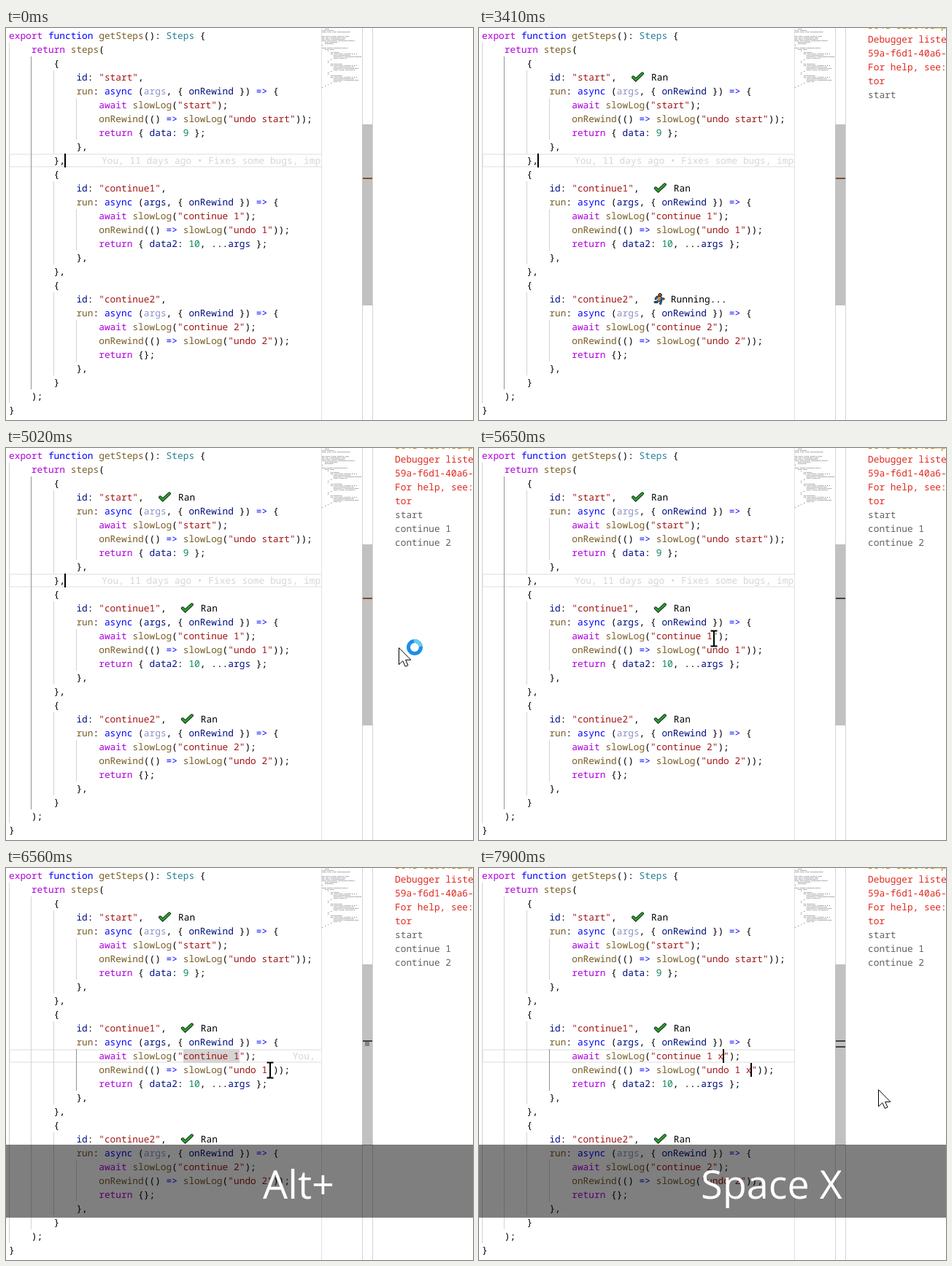
An HTML page for the animation above (7990 ms loop, 640 px wide and 537 px high).

```html
<!DOCTYPE html>
<html lang="en">
<head>
<meta charset="utf-8">
<title>Step runner</title>
<style>
  html, body { margin: 0; width: 100%; height: 100%; overflow: hidden; background: #fff; }
  svg { display: block; }
  #stage { width: 100vw; height: 100vh; }
  text { font: 12.83px "Noto Sans Mono", "DejaVu Sans Mono", monospace; text-rendering: geometricPrecision; }
  #keys { font: 54px "Open Sans", "Noto Sans", sans-serif; fill: #fff; text-anchor: middle; }
</style>
</head>
<body>
<svg id="stage" viewBox="0 0 640 537">
  <svg width="433" height="537">
    <rect id="current" x="5" width="440" height="17" fill="none" stroke="#eee" stroke-width="2"/>
    <rect id="occurrence" x="243" y="248" width="77" height="19" fill="#d5d5d5"/>
    <g id="guides" fill="none" stroke="#d3d3d3"></g>
    <path id="activeGuide" fill="none" stroke="#939393"/>
    <g id="code"></g>
    <text id="blame" fill="#d6d6d6">You, 11 days ago • Fixes some bugs, improves</text>
    <g id="status"></g>
    <g id="carets"></g>
  </svg>

  <path d="M432.5 0V537" stroke="#e2e2e2"/>
  <path id="minimap" fill="none" stroke="#444" stroke-opacity=".6" stroke-dasharray="1.4 .6"/>
  <rect id="mapSlider" x="433" y="26" width="55" height="57" fill="#646464" fill-opacity=".2"/>
  <path d="M488.5 0V537M502.5 0V537" stroke="#d4d4d4"/>
  <rect id="scroll" x="488" y="132" width="14" height="248"/>
  <g id="ruler"></g>
  <g id="terminal"></g>

  <g id="band">
    <rect y="379" width="640" height="100" fill-opacity=".5"/>
    <text id="keys" x="401" y="453"></text>
  </g>

  <g id="mouse">
    <g id="arrow">
      <path d="M.5.7V23.7L5.8 18.7 9.3 26.3 13 24.7 9.6 17.3H16.8Z" fill="#fff" stroke="#000"/>
      <g id="busy" transform="translate(22)" fill="none" stroke-width="5">
        <circle r="8.5" stroke="#1d8fe6"/>
        <path id="spark" d="M-8.5 0A8.5 8.5 0 0 1 0-8.5" stroke="#62cdf5"/>
      </g>
    </g>
    <g id="beam" fill="none">
      <path d="M-5-10.5H5M0-11V11M-5 10.5H5" stroke="#fff" stroke-width="4"/>
      <path d="M-4.5-10.5H-1L0-9.5 1-10.5H4.5M0-10V10M-4.5 10.5H-1L0 9.5 1 10.5H4.5" stroke="#000" stroke-width="2"/>
    </g>
  </g>
</svg>

<script>
const LOOP = 7990, LINE = 19, CHAR = 7.7;
const el = id => document.getElementById(id);
const colX = col => 4 + col * CHAR;
const lineY = line => 1 + line * LINE;
const show = (id, on) => el(id).setAttribute("visibility", on ? "visible" : "hidden");
const set = (id, attrs) => { for (const k in attrs) el(id).setAttribute(k, attrs[k]); };

// Source text
const stepLines = (id, log, undo, result, end) => [
  "        {",
  `            id: "${id}",`,
  "            run: async (args, { onRewind }) => {",
  `                await slowLog("${log}");`,
  `                onRewind(() => slowLog("${undo}"));`,
  `                return ${result};`,
  "            },",
  "        }" + end];

const sourceLines = suffix => [
  "export function getSteps(): Steps {",
  "    return steps(",
  ...stepLines("start", "start", "undo start", "{ data: 9 }", ","),
  ...stepLines("continue1", "continue 1" + suffix, "undo 1" + suffix, "{ data2: 10, ...args }", ","),
  ...stepLines("continue2", "continue 2", "undo 2", "{}", ""),
  "    );",
  "}"];

function tokenColor(token, next) {
  if (token[0] === '"') return "#a31515";
  if (/^(export|return|await)$/.test(token)) return "#af00db";
  if (/^(function|async|=>)$/.test(token)) return "#0000ff";
  if (token === "Steps") return "#267f99";
  if (/^\d/.test(token)) return "#098658";
  if (token === "run" || (/^\w/.test(token) && next === "(")) return "#795e26";
  return /^\w/.test(token) ? "#001080" : "#000";
}

function codeLine(text, line) {
  const spans = [...text.matchAll(/"[^"]*"|=>|\w+|[^\s\w]+?/g)].map(({ 0: token, index }) => {
    const faded = token === "args" && (line === 4 || line === 20);
    return `<tspan x="${colX(index)}" fill="${tokenColor(token, text[index + token.length])}"` +
      `${faded ? ' fill-opacity=".45"' : ""}>${token}</tspan>`;
  });
  return `<text y="${lineY(line) + 14}">${spans.join("")}</text>`;
}

// Indent guides: column, first line, last line
const guide = (col, from, to) => `M${Math.floor(colX(col)) + .5} ${lineY(from)}V${lineY(to + 1)}`;
const guides = [guide(0, 1, 26), guide(4, 2, 25)];
for (const first of [2, 10, 18]) guides.push(guide(8, first + 1, first + 6), guide(12, first + 3, first + 5));
el("guides").innerHTML = `<path d="${guides.join("")}"/>`;

// Minimap: every word becomes a dash
const header = ["    steps,", '} from "./list";', 'import { wait } from "./tools/waiting";', "", "",
  "type Logger = (text: string) => void;", "type Args = Record<string, any>;", "type Result = Promise<unknown>;",
  "export async function slowLog(text: string) {", "    await wait(1000);", "    print(text);", "}", ""];
el("minimap").setAttribute("d", [...header, ...sourceLines("")].flatMap((text, i) =>
  [...text.matchAll(/\S+/g)].map(m => `M${433 + m.index} ${1.5 + 2 * i}h${m[0].length}`)).join(""));

// Status badges
const limbs = "M8 5 4.5 5.5 2.5 8M8.5 5 11 8H13.5M6.5 9.5 10 11 9 14.5M6.5 9.5 4.5 12.5H1.5";
const hook = "M3 4.5Q3 1.8 6 1.8T9 4.6Q9 6.5 6.2 8.6V10.5M6.2 13.2V13.4";
const tick = "M2.5 8.5 6 12 15 3.5";
const outlined = (d, outer, inner, color) =>
  `<path d="${d}" stroke="#111" stroke-width="${outer}"/><path d="${d}" stroke="${color}" stroke-width="${inner}"/>`;
const badges = {
  run: { label: "Running...", dx: 23.2, icon: outlined(limbs, 3, 1.5, "#2478b8") +
    '<path d="M8 5.5 6.8 9" stroke="#e8842c" stroke-width="3.4"/>' +
    '<circle cx="8.5" cy="2.7" r="2.2" fill="#a85a2a" stroke="#111"/>' },
  wait: { label: "Not run", dx: 20.5, icon: outlined(hook, 3.4, 1.4, "#fff") },
  done: { label: "Ran", dx: 27.2, icon: outlined(tick, 4.4, 2.6, "#25a52b") }
};
const badgeSpots = [[24, 3], [28, 11], [28, 19]];
function badge(kind, i) {
  const [col, line] = badgeSpots[i], { label, dx, icon } = badges[kind];
  const x = colX(col) + 20, y = lineY(line);
  return `<g transform="translate(${x} ${y + 1})" fill="none" stroke-linecap="round">${icon}</g>` +
    `<text x="${x + dx}" y="${y + 14}">${label}</text>`;
}

// Terminal: row, text, colour, time of printing
const RED = "#e0291f", GREY = "#616161";
const output = [
  [-1, "5641 dist\\simple", "#b8860b", 380],
  [0, "Debugger listening", RED, 380],
  [1, "59a-f6d1-40a6-", RED, 380],
  [2, "For help, see:", RED, 380],
  [3, "tor", RED, 380],
  [4, "start", GREY, 2480],
  [5, "continue 1", GREY, 3490],
  [6, "continue 2", GREY, 4490]];

// Step tables: [time, value]
const caretOn = [[0, 1], [460, 0], [1010, 1], [1470, 0], [2020, 1], [2480, 0], [2940, 1], [3490, 0], [3950, 1],
  [4490, 0], [4990, 1], [5490, 0], [5960, 1], [6540, 0], [6730, 1], [7230, 0], [7270, 1]];
const statuses = [[0, ""], [1390, "run wait wait"], [2400, "done run wait"], [3410, "done done run"], [4330, "done done done"]];
const suffixes = [[0, ""], [7270, " "], [7430, " x"]];
const keyTexts = [[0, ""], [6560, "Alt+"], [7270, "Space"], [7430, "Space X"]];
const mousePath = [[4790, 595, 276], [5570, 323, 261], [5650, 322, 261], [6030, 322, 261],
  [6330, 362, 277], [7270, 362, 277], [7510, 455, 291], [7900, 547, 303]];

const at = (table, t) => table.findLast(row => row[0] <= t)[1];

function mouseAt(t) {
  const i = mousePath.findLastIndex(p => p[0] <= t);
  const [t0, x0, y0] = mousePath[i], next = mousePath[i + 1];
  if (!next) return [x0, y0];
  const p = (t - t0) / (next[0] - t0);
  const last = i === mousePath.length - 2;
  const e = last ? 1 - (1 - p) ** 2 : p * p * (3 - 2 * p);
  return [x0 + (next[1] - x0) * e, y0 + (next[2] - y0) * e];
}

const shown = {};
function html(id, key, build) {
  if (shown[id] === key) return;
  shown[id] = key;
  el(id).innerHTML = build();
}

const mark = (y, color) => `<rect x="489" y="${y}" width="13" height="2" fill="${color}"/>`;
function rulerMarks(state) {
  if (state === "debug") return mark(205, "#7d4f33");
  if (state === "idle") return mark(205, "#424242");
  if (state === "two") return mark(236, "#424242") + mark(244, "#424242");
  return (state === "word" ? '<rect x="492" y="237" width="6" height="7" fill="#858585"/>' : "") + mark(236, "#424242");
}

function drawEditor(t) {
  const moved = t >= 5960, multi = t >= 6730, word = t >= 6250 && !multi;
  const suffix = at(suffixes, t), line = moved ? 13 : 9;
  html("code", suffix, () => sourceLines(suffix).map(codeLine).join(""));
  set("current", { y: lineY(line) + 1 });
  set("activeGuide", { d: moved ? guide(12, 13, 15) : guide(4, 2, 25) });
  set("blame", { x: colX(moved ? 44 : 10) + 50, y: lineY(line) + 14 });
  show("blame", !moved || word);
  show("occurrence", word);

  const spots = moved ? [[41, 13]] : [[10, 9]];
  if (multi) spots.push([46, 14]);
  const on = at(caretOn, t);
  html("carets", [on, spots, suffix].join(), () => on ? spots.map(([col, row]) =>
    `<rect x="${Math.floor(colX(col + suffix.length) - .9)}" y="${lineY(row)}" width="2" height="19"/>`).join("") : "");

  const status = at(statuses, t);
  html("status", status, () => status && status.split(" ").map(badge).join(""));
  const ruler = multi ? "two" : word ? "word" : moved ? "one" : t >= 5100 ? "idle" : "debug";
  html("ruler", ruler, () => rulerMarks(ruler));
}

function drawTerminal(t) {
  const rows = output.filter(row => t >= row[3]);
  html("terminal", rows.length, () => rows.map(([row, text, color]) =>
    `<text x="533" y="${20 + row * LINE}" fill="${color}">${text}</text>`).join(""));
}

function drawMouse(t) {
  const visible = t >= 4790, [x, y] = visible ? mouseAt(t) : [0, 0];
  const overText = x < 433;
  set("mouse", { transform: `translate(${Math.round(x)} ${Math.round(y)})`, display: visible ? "inline" : "none" });
  show("arrow", !overText);
  show("beam", overText);
  set("busy", { display: t < 5600 ? "inline" : "none" });
  set("spark", { transform: `rotate(${(t - 4790) * .36})` });
  show("mapSlider", visible && x >= 433 && x < 488);
  set("scroll", { fill: visible && x >= 488 && x < 502 ? "#929292" : "#c1c1c1" });
}

function draw() {
  const t = performance.now() % LOOP, keys = at(keyTexts, t);
  drawEditor(t);
  drawTerminal(t);
  drawMouse(t);
  show("band", keys);
  html("keys", keys, () => keys);
  requestAnimationFrame(draw);
}
draw();
</script>
</body>
</html>
```
